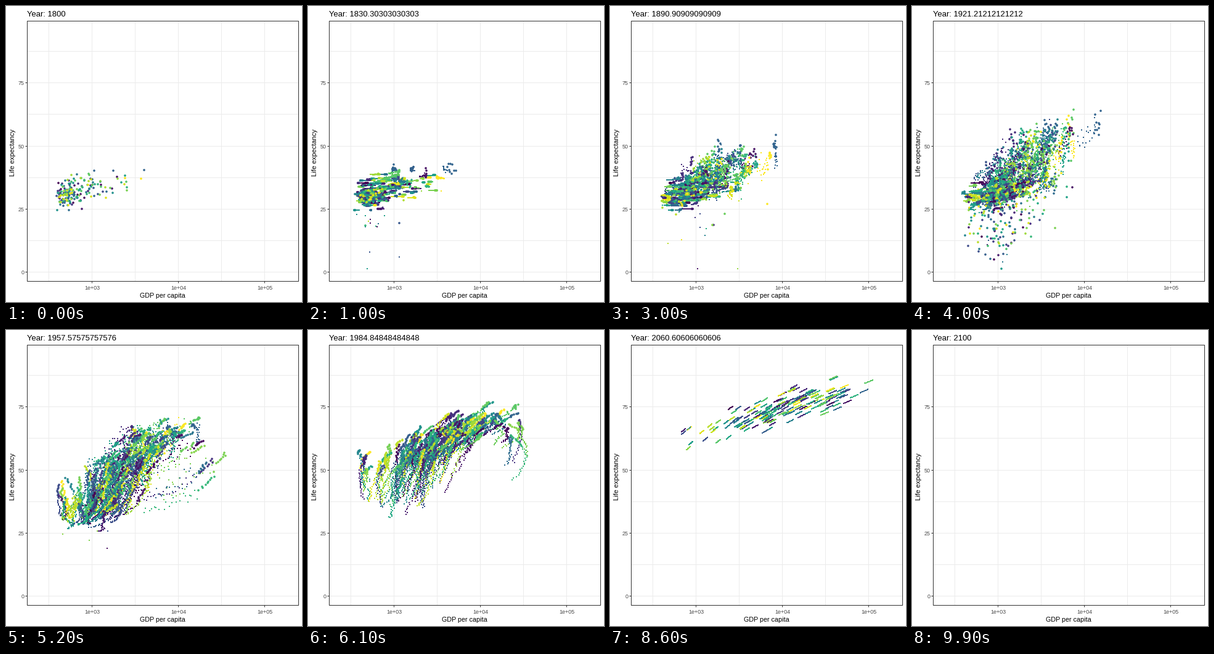
A matplotlib script for the animation above (10 s loop, 480x480 px).

```python
import numpy as np
import matplotlib.pyplot as plt
from matplotlib.animation import FuncAnimation
from matplotlib.patches import Rectangle

FRAMES, DETAIL, WAKE, BIG = 100, 3, 30, 9
COUNTRIES, LAST_YEAR = 184, 2040
PX = 0.75  # points per pixel at 96 dpi
LEFT, RIGHT, TOP, BOTTOM = 34.5, 474.5, 24.5, 446.5

rng = np.random.default_rng(5)
years = np.linspace(1800, 2100, (FRAMES - 1) * DETAIL + 1)
t = years[:, None]


def sigmoid(v):
    return 1 / (1 + np.exp(-v))


def bell():
    return np.clip(rng.normal(size=COUNTRIES), -2.4, 2.4)


def income():
    """Horizontal pixel position of every country in every step, plus early and late rank."""
    early = bell()
    late = np.clip(0.65 * early + 0.76 * bell(), -2.3, 2.3)
    u = np.clip((t - 1800) / 240, 0, 1.2)
    mix = np.clip((t - 1800) / 170, 0, 1)
    rank = (1 - mix) * early + mix * late
    rank /= np.sqrt((1 - mix) ** 2 + mix ** 2 + 1.3 * mix * (1 - mix))
    skew = 8 * sigmoid((1950 - t) / 15)
    x = 120 + 168 * u ** 1.75 + (28 + 44 * u ** 1.2) * rank + skew * (rank ** 2 - 1)

    # economic cycles and yearly noise, dying out in the forecast
    calm = np.clip((2030 - t) / 20, 0, 1)
    for amp, period in ((6, 85), (3, 35), (1.2, 12)):
        pace = 2 * np.pi / (period * rng.uniform(0.7, 1.3, COUNTRIES))
        phase = rng.uniform(0, 2 * np.pi, COUNTRIES)
        x += calm * amp * rng.normal(size=COUNTRIES) * np.sin(pace * t + phase)
    jitter = 0.3 + sigmoid((t - 1900) / 12)
    x += calm * jitter * rng.normal(size=x.shape)

    # a few sudden oil booms that later fade
    boom = rng.uniform(50, 140, COUNTRIES) * (rng.random(COUNTRIES) < 0.08)
    boom *= (late > 0.2) & (late < 1.3)
    x += boom * sigmoid((t - 1940) / 6) * (1 - 0.75 * sigmoid((t - 1985) / 10))
    return x, early, late


def lifespan(early, late):
    """Life expectancy: a flat past, a sigmoid rise, a slow steady gain, and crises."""
    lead = 0.85 * late + 0.5 * bell()
    q = np.argsort(np.argsort(lead)) / (COUNTRIES - 1)
    end = 75.5 + 5.3 * late + 3 * bell()
    start = np.clip(31 + early + 2.6 * bell() + 5 * q ** 3, 24, 40)
    middle = 1962 - 56 * q ** 2.5 + 8 * bell() * (1 - q ** 2)
    rise = sigmoid((t - middle) / (10 + 15 * q ** 2))
    target = end - 0.15 * (LAST_YEAR - np.clip(t, 1970, LAST_YEAR))
    life = start + (target - start) * rise

    shape = life.shape
    onset = 1825 + 220 * (1 - q)
    life += 2.2 * sigmoid((t - onset) / 8) * (t < 1950) * rng.normal(size=shape)
    risk = np.where(t < 1950, 0.006, 0.0003)
    life -= (rng.random(shape) < risk) * rng.exponential(9, shape)
    flu = np.argmin(abs(years - 1918.2))
    life[flu] -= rng.uniform(2, 23, COUNTRIES)
    life[flu + 1] -= rng.uniform(0, 6, COUNTRIES)

    epidemic = (rng.random(COUNTRIES) < 0.2) & (late < 0.5)
    life -= epidemic * rng.uniform(5, 17, COUNTRIES) * np.exp(-((t - 2001) / 9) ** 2)
    return np.maximum(life, 1.5)


x, early, late = income()
spots = np.round(np.stack([x, 432 - 4.1 * lifespan(early, late)], axis=-1))
live = int(np.sum(years <= LAST_YEAR))
palette = plt.get_cmap("viridis")(np.linspace(0, 1, COUNTRIES))

plt.rcParams["font.family"] = "Liberation Sans"
fig = plt.figure(figsize=(5, 5), dpi=96, facecolor="white")
ax = fig.add_axes([0, 0, 1, 1])
ax.set(xlim=(0, 480), ylim=(480, 0))
ax.axis("off")


def line(xs, ys, color):
    ax.plot(xs, ys, color=color, lw=PX, zorder=1, solid_capstyle="butt", snap=False)


def label(px, py, text, size, color="black", **kw):
    return ax.text(px, py, text, fontsize=size * PX, color=color, **kw)


GREY, DARK, TICK = "#ebebeb", "#333333", "#4d4d4d"
for i in range(6):
    gx = 69.5 + 70 * i
    line([gx, gx], [TOP, BOTTOM], GREY)
    if i % 2:
        line([gx, gx], [BOTTOM, BOTTOM + 3], DARK)
        label(gx, 460, f"1e+0{3 + i // 2}", 9, TICK, ha="center")
for i in range(8):
    gy = np.floor(431.9 - 51.2 * i) + 0.5
    line([LEFT, RIGHT], [gy, gy], GREY)
    if i % 2 == 0:
        line([LEFT - 3, LEFT], [gy, gy], DARK)
        label(29.5, gy + 3.5, f"{12.5 * i:.0f}", 9, TICK, ha="right")
ax.add_patch(Rectangle((LEFT, TOP), RIGHT - LEFT, BOTTOM - TOP, fill=False,
                       ec=DARK, lw=PX, zorder=5, snap=False))
label(254, 473, "GDP per capita", 10.7, ha="center")
label(11.5, 237.5, "Life expectancy", 11, ha="center", va="center", rotation=90)
title = label(33.5, 17, "", 13)

small = ax.scatter([], [], s=(2 * PX) ** 2, marker="s", lw=0, zorder=3, antialiased=False)
large = ax.scatter([], [], s=(3.6 * PX) ** 2, marker="o", lw=0, zorder=4)


def show(dots, first, last):
    """Put steps first..last (oldest first) into a scatter."""
    steps = spots[max(first, 0):max(min(last + 1, live), 0)]
    dots.set_offsets(steps.reshape(-1, 2))
    dots.set_facecolor(np.tile(palette, (len(steps), 1)))


def draw(frame):
    now = frame * DETAIL
    show(small, now - WAKE + 1, now - BIG)
    show(large, now - BIG + 1, now)
    title.set_text(f"Year: {1800 + 300 * frame / (FRAMES - 1):.15g}")
    return small, large, title


anim = FuncAnimation(fig, draw, frames=FRAMES, interval=100, repeat=True, repeat_delay=0)
plt.show()
```
